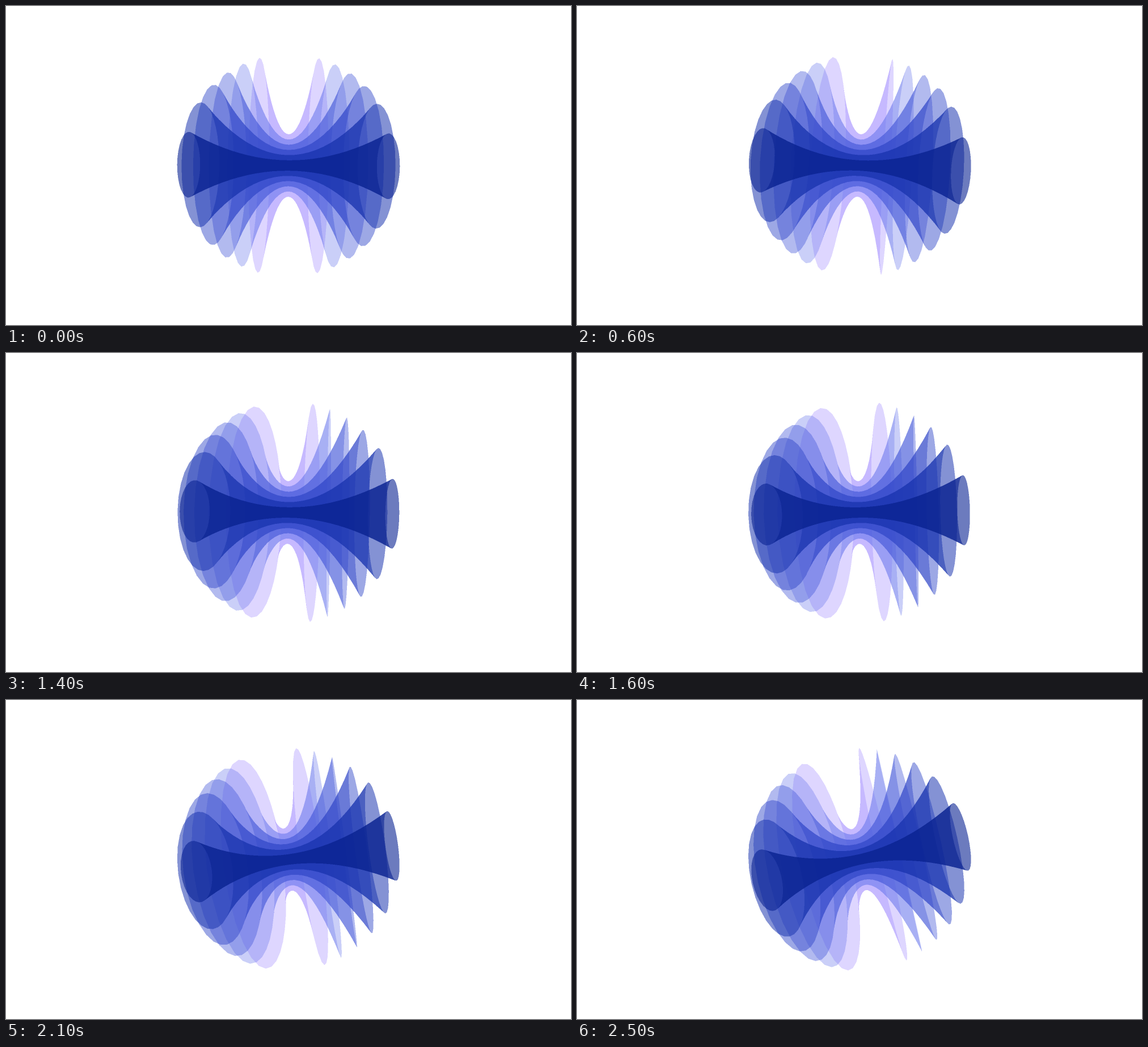
An HTML page with a canvas for the animation above (2600 ms loop, 996 px wide and 562 px high).

```html
<!DOCTYPE html>
<html lang="en">
<head>
<meta charset="utf-8">
<title>Nested horns</title>
<style>
  html, body { margin: 0; width: 100%; height: 100%; overflow: hidden; background: #fff; }
  canvas { display: block; }
</style>
</head>
<body>
<canvas id="stage" width="996" height="562"></canvas>
<script>
const LOOP = 2600, STEP = 100;
const RADIUS = 183, CAMERA = 500;
const CX = 498, CY = 281;
const SIDES = 32, RINGS = 24;
const SIZE = 404, SS = 2, W = SIZE * SS;

// Outermost surface first; each encloses the next.
const COLORS = [
  [137, 109, 255], [102, 116, 235], [67, 87, 216],
  [48, 70, 200], [25, 52, 175], [10, 35, 146]
];
const shells = COLORS.map((color, i) => {
  const k = 6 - i;
  const half = 173.7 - 25.6 * (k - 1);
  return {
    color, half,
    alpha: 0.664 - 0.064 * k,
    neck: 9.15 * k,
    rim: Math.sqrt(RADIUS * RADIUS - half * half)
  };
});

// Pose keys: time, roll, yaw.
const KEYS = [
  [0, 0.008, 0], [600, 0.053, 0.06], [1000, 0.048, 0.1], [1400, 0.012, 0.16],
  [1800, -0.062, 0.19], [2300, -0.177, 0.167], [2500, -0.22, 0.14]
];

function slope(i, c) {
  const a = KEYS[Math.max(i - 1, 0)], b = KEYS[Math.min(i + 1, KEYS.length - 1)];
  return (b[c] - a[c]) / (b[0] - a[0]);
}

function pose(t, c) {
  let i = 0;
  while (i < KEYS.length - 2 && t >= KEYS[i + 1][0]) i++;
  const a = KEYS[i], b = KEYS[i + 1], d = b[0] - a[0], s = (t - a[0]) / d;
  const s2 = s * s, s3 = s2 * s;
  return (2 * s3 - 3 * s2 + 1) * a[c] + (s3 - 2 * s2 + s) * d * slope(i, c) +
    (3 * s2 - 2 * s3) * b[c] + (s3 - s2) * d * slope(i + 1, c);
}

const ctx = document.getElementById('stage').getContext('2d');
const buffer = document.createElement('canvas');
buffer.width = buffer.height = W;
const bctx = buffer.getContext('2d');
const image = bctx.createImageData(W, W);
const px = image.data;

function edgeX(a, b, y) {
  return a[0] + (b[0] - a[0]) * (y - a[1]) / (b[1] - a[1]);
}

// Blends one triangle; shared edges never overlap or leave gaps.
function triangle(a, b, c, [r, g, bl], alpha) {
  let swap;
  if (b[1] < a[1]) { swap = a; a = b; b = swap; }
  if (c[1] < b[1]) { swap = b; b = c; c = swap; }
  if (b[1] < a[1]) { swap = a; a = b; b = swap; }
  const top = Math.max(0, Math.ceil(a[1] - 0.5));
  const bottom = Math.min(W, Math.ceil(c[1] - 0.5));
  for (let y = top; y < bottom; y++) {
    const yc = y + 0.5;
    const x1 = edgeX(a, c, yc);
    const x2 = yc <= b[1] ? edgeX(a, b, yc) : edgeX(b, c, yc);
    const from = Math.max(0, Math.ceil(Math.min(x1, x2) - 0.5));
    const to = Math.min(W, Math.ceil(Math.max(x1, x2) - 0.5));
    for (let p = (y * W + from) * 4, end = (y * W + to) * 4; p < end; p += 4) {
      px[p] += (r - px[p]) * alpha;
      px[p + 1] += (g - px[p + 1]) * alpha;
      px[p + 2] += (bl - px[p + 2]) * alpha;
    }
  }
}

function draw(t) {
  const roll = pose(t, 1), yaw = pose(t, 2);
  const cr = Math.cos(roll), sr = Math.sin(roll);
  const cy = Math.cos(yaw), sy = Math.sin(yaw);

  const project = (x, y, z) => {
    const u = x * cy - z * sy;
    const scale = SS * CAMERA / (CAMERA - x * sy - z * cy);
    return [W / 2 + (u * cr - y * sr) * scale, W / 2 + (u * sr + y * cr) * scale];
  };

  px.fill(255);
  for (const { color, alpha, half, neck, rim } of shells) {
    let last = null;
    for (let i = 0; i <= RINGS; i++) {
      const s = 2 * i / RINGS - 1;
      const r = neck + (rim - neck) * s * s;
      const ring = [];
      for (let j = 0; j < SIDES; j++) {
        const a = 2 * Math.PI * j / SIDES;
        ring.push(project(s * half, r * Math.cos(a), r * Math.sin(a)));
      }
      for (let j = 0; last && j < SIDES; j++) {
        const n = (j + 1) % SIDES;
        triangle(last[j], last[n], ring[j], color, alpha);
        triangle(last[n], ring[n], ring[j], color, alpha);
      }
      last = ring;
    }
  }
  bctx.putImageData(image, 0, 0);
  ctx.fillStyle = '#fff';
  ctx.fillRect(0, 0, 996, 562);
  ctx.drawImage(buffer, CX - SIZE / 2, CY - SIZE / 2, SIZE, SIZE);
}

const start = performance.now();
let shown = -1;
function tick() {
  const t = Math.floor((performance.now() - start) % LOOP / STEP) * STEP;
  if (t !== shown) draw(shown = t);
  requestAnimationFrame(tick);
}
tick();
</script>
</body>
</html>
```
